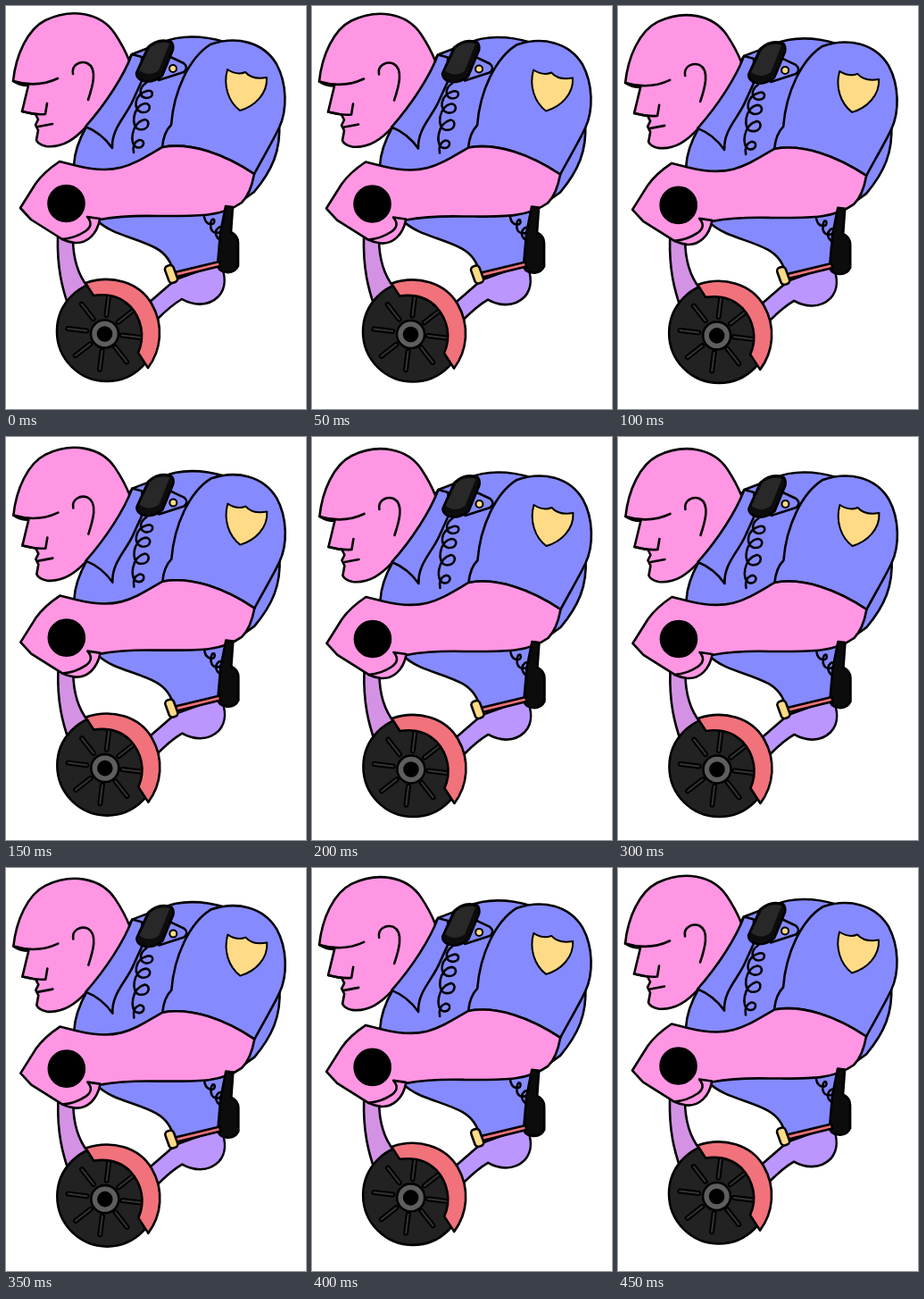
Animation, 336 px wide and 451 px high, one loop 0.5 s. Source, as an HTML page:

```html
<!DOCTYPE html>
<html lang="en">
<head>
<meta charset="utf-8">
<title>Riding officer</title>
<style>
  html, body { margin: 0; width: 100%; height: 100%; overflow: hidden; background: #fff; }
  svg { display: block; width: 336px; height: 451px; }
  #rider { fill: none; stroke: #000; stroke-width: 2.6; stroke-linejoin: round; stroke-linecap: round; }
  .skin { fill: #ff96e3; }
  .cloth { fill: #868aff; }
  .seat { fill: #bb96ff; }
  .stem { fill: #d492e5; }
  .red { fill: #f1727b; }
  .gold { fill: #ffda87; }
  .dark { fill: #222; }
  .black { fill: #0c0c0c; }
</style>
</head>
<body>
<svg viewBox="0 0 336 451">
  <g id="rider">
    <path class="seat" d="M160 332L190 306L240 288C246 301 247 315 238 325C226 337 209 335 197 328Q185 335 170 350Z"/>
    <path class="stem" d="M58 258C57 293 63 316 70 336L92 315C80 300 75 282 75 260Z"/>

    <path class="cloth" d="M141 54L175 41C194 32 221 33 244 40L306 130C308 162 298 184 278 208L250 228L240 289L188 299Q184 280 168 271C146 259 118 256 102 240L76 178Q77 158 90 135Z"/>
    <path class="skin" d="M8 84C11 55 24 26 44 16C73 2 106 7 122 31Q132 46 138 61L130 92L90 135C78 148 64 159 45 157Q36 155 34 150L36 139L33 133L36 127L33 121L18 118L25 89Q15 89 8 84Z"/>
    <path d="M8 84Q35 92 58 81M18 118Q31 122 44 121L46 109M36 135L52 132M75 76C73 66 83 61 91 64C103 70 97 90 92 105"/>
    <path class="cloth" d="M141 54C132 78 112 109 89 135Q107 142 119 159C118 137 134 124 142 106L152 84V57Z"/>

    <path class="cloth" d="M182 56L199 64Q205 69 199 74L171 83Z"/>
    <circle class="gold" cx="187" cy="70" r="4" stroke-width="2"/>
    <path class="black" d="M146 75L159 46Q171 35 185 40Q188 43 187 49L175 78Q163 88 151 83Q146 80 146 75Z"/>
    <path fill="#282828" stroke="none" d="M149 72L161 47Q171 38 183 42L171 72Q160 80 149 72Z"/>
    <path d="M157 86C148 92 149 102 157 103C166 103 166 93 158 95C143 99 142 117 152 119C163 120 163 109 156 109C142 111 139 136 149 138C161 140 162 127 155 127C140 131 138 155 146 158C155 161 157 149 149 150Q141 153 143 164"/>

    <path class="cloth" d="M175 158C176 147 180 138 185 133C188 95 205 58 229 43C258 33 288 40 303 65C315 87 315 117 306 136C299 151 287 171 278 188C245 166 207 152 175 158Z"/>
    <path class="gold" stroke-width="2" d="M248 71Q259 78 268 74Q276 83 292 80C293 98 279 112 262 117C249 107 243 89 248 71Z"/>

    <path class="skin" d="M60 174L80 179C126 190 142 177 175 158C207 152 245 166 278 188Q274 210 264 220C240 237 211 235 170 235Q133 234 105 239C102 255 91 266 77 265Q69 264 63 261L28 239L16 226L33 199Q42 186 60 174Z"/>
    <path d="M105 238L91 236Q99 245 89 252Q77 260 63 261"/>
    <circle cx="67.5" cy="221" r="20" fill="#000"/>

    <path d="M222 236C224 247 236 246 233 239C229 236 226 252 235 254C244 254 243 245 238 248C231 254 237 264 246 262"/>
    <path class="black" d="M246 224L254 225L252 253Q260 257 260 265V291Q256 299 247 298Q237 297 237 289L240 254Z"/>
    <path class="red" d="M189 298L239 286L240 291L191 303Z"/>
    <rect class="gold" x="-5" y="-10" width="10" height="20" rx="4" transform="translate(185 300) rotate(-20)"/>

    <circle class="dark" cx="113" cy="364" r="56"/>
    <g id="spokes"></g>
    <path class="red" d="M89 310C118 300 149 309 163 333C177 357 174 385 159 405L148 388C156 370 152 350 139 336C127 324 112 322 98 324Z"/>
    <circle cx="110.5" cy="367" r="15.5" fill="#5e5e5e"/>
    <circle cx="110.5" cy="367" r="7.5" fill="#000"/>
  </g>
</svg>
<script>
  const rider = document.getElementById("rider");
  const spokes = document.getElementById("spokes");
  const LOOP = 500, STEP = 50, DROP = 5.5;

  for (let i = 0; i < 8; i++) {
    const turn = `rotate(${i * 45 + 7} 110 366)`;
    spokes.innerHTML +=
      `<path d="M130 366H151" transform="${turn}" stroke-width="6"/>` +
      `<path d="M130 366H151" transform="${turn}" stroke="#333" stroke-width="2"/>`;
  }

  function draw(now) {
    const t = Math.floor((now % LOOP) / STEP) * STEP;
    const dip = (1 - Math.cos(2 * Math.PI * t / LOOP)) / 2;
    rider.setAttribute("transform", `translate(${0.5 * dip} ${DROP * dip})`);
    requestAnimationFrame(draw);
  }
  draw(performance.now());
</script>
</body>
</html>
```
